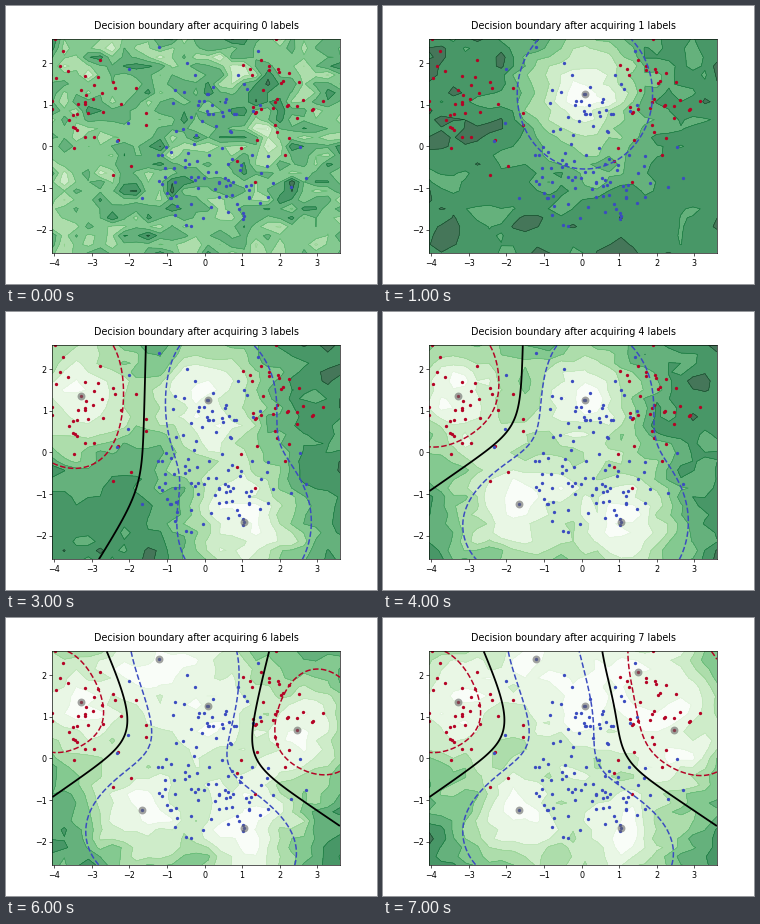
Write a matplotlib script that moves like this. It is 371 by 278 pixels and loops after 8 s.

```python
import numpy as np
import matplotlib.pyplot as plt
from matplotlib.animation import FuncAnimation

# At 72 dpi one point is one pixel; K keeps default style sizes in proportion.
W, H, DPI, K = 371, 278, 72, 58 / 72
XLIM, YLIM = (-4.046, 3.601), (-2.564, 2.569)
RED, BLUE = "#b40426", "#3b4cc0"

plt.rcParams.update({
    "font.family": "DejaVu Sans", "font.size": 10 * K,
    "axes.linewidth": 0.8 * K,
    "xtick.major.size": 3.5 * K, "ytick.major.size": 3.5 * K,
    "xtick.major.width": 0.8 * K, "ytick.major.width": 0.8 * K,
    "xtick.major.pad": 3.5 * K, "ytick.major.pad": 3.5 * K,
})

# Labelled points in the order they are acquired.
labels = [
    (0.09, 1.26, BLUE), (1.04, -1.67, BLUE), (-3.28, 1.355, RED),
    (-1.66, -1.235, BLUE), (2.47, 0.68, RED), (-1.2, 2.375, BLUE),
    (1.5, 2.075, RED),
]

# Unlabelled pool: colour, size, centre and spread of each cluster.
clusters = [
    (RED, 38, (-2.95, 0.9), (0.68, 0.75)),
    (RED, 36, (1.87, 1.0), (0.6, 0.7)),
    (BLUE, 42, (0.1, 0.85), (0.72, 0.65)),
    (BLUE, 68, (-0.1, -0.85), (1.0, 0.58)),
]
rng = np.random.default_rng(4)
pool = [(color, rng.normal(mid, spread, (n, 2)))
        for color, n, mid, spread in clusters]


def grid(n):
    return np.meshgrid(np.linspace(*XLIM, n), np.linspace(*YLIM, n))


coarse, fine = grid(25), grid(120)
greens = plt.get_cmap("Greens")(np.linspace(0, 1, 8))[:, :3]
fills = 1 - 0.73 * (1 - greens)


def dist2(mesh, label):
    return (mesh[0] - label[0]) ** 2 + (mesh[1] - label[1]) ** 2


def noise(seed, blur):
    n = np.random.default_rng(seed).normal(size=coarse[0].shape)
    n = n + blur * sum(np.roll(n, s, a) for s in (-1, 1) for a in (0, 1))
    return (n - n.mean()) / n.std()


def uncertainty(known):
    """Band value 0..8: high everywhere, falling off near known labels."""
    if known:
        v = 0.8 + 5.85 * np.prod(
            [1 - np.exp(-dist2(coarse, p) / 2.5) for p in known], axis=0)
        v += 0.45 * noise(20 + len(known), 0.35)
    else:
        v = 4.75 + 1.0 * noise(5, 0.1)
    return np.clip(v, 0.05, 7.95)


def score(known, color):
    """Kernel support for one class on the fine grid."""
    return np.sqrt(sum((np.exp(-dist2(fine, p) / 2)
                        for p in known if p[2] == color),
                       np.zeros_like(fine[0])))


def draw_boundary(known):
    level = np.exp(-0.81)
    margin = score(known, BLUE) - score(known, RED)
    ax.contour(*fine, margin, levels=[-level, 0, level],
               colors=[RED, "black", BLUE], linestyles=["--", "-", "--"],
               linewidths=[1.5, 1.8, 1.5], zorder=2.2)


def set_axes():
    ax.set_xlim(XLIM)
    ax.set_ylim(YLIM)
    ax.set_xticks(range(-4, 4))
    ax.set_yticks(range(-2, 3))


def draw(count):
    ax.clear()
    known = labels[:count]
    field = uncertainty(known)
    ax.contourf(*coarse, field, levels=np.arange(9), colors=fills)
    ax.contour(*coarse, field, levels=np.arange(1, 8), colors=greens[1:],
               linewidths=0.5, zorder=1.5)
    dot = dict(s=11, linewidths=0, zorder=2)
    for color, pts in pool:
        ax.scatter(*pts.T, color=color, **dot)
    for x, y, color in labels:
        ax.scatter(x, y, color=color, **dot)
    if known:
        draw_boundary(known)
        x, y, _ = zip(*known)
        ax.scatter(x, y, s=62, color="0.4", alpha=0.6, linewidths=0, zorder=2.4)
    ax.text(0.5, 1.05, f"Decision boundary after acquiring {count} labels",
            transform=ax.transAxes, ha="center", fontsize=12 * K)
    set_axes()


fig = plt.figure(figsize=(W / DPI, H / DPI), dpi=DPI, facecolor="white")
ax = fig.add_axes([0.125, 0.11, 0.775, 0.77])
anim = FuncAnimation(fig, draw, frames=len(labels) + 1,
                     init_func=lambda: draw(0), interval=1000,
                     repeat=True, repeat_delay=0)
plt.show()
```
